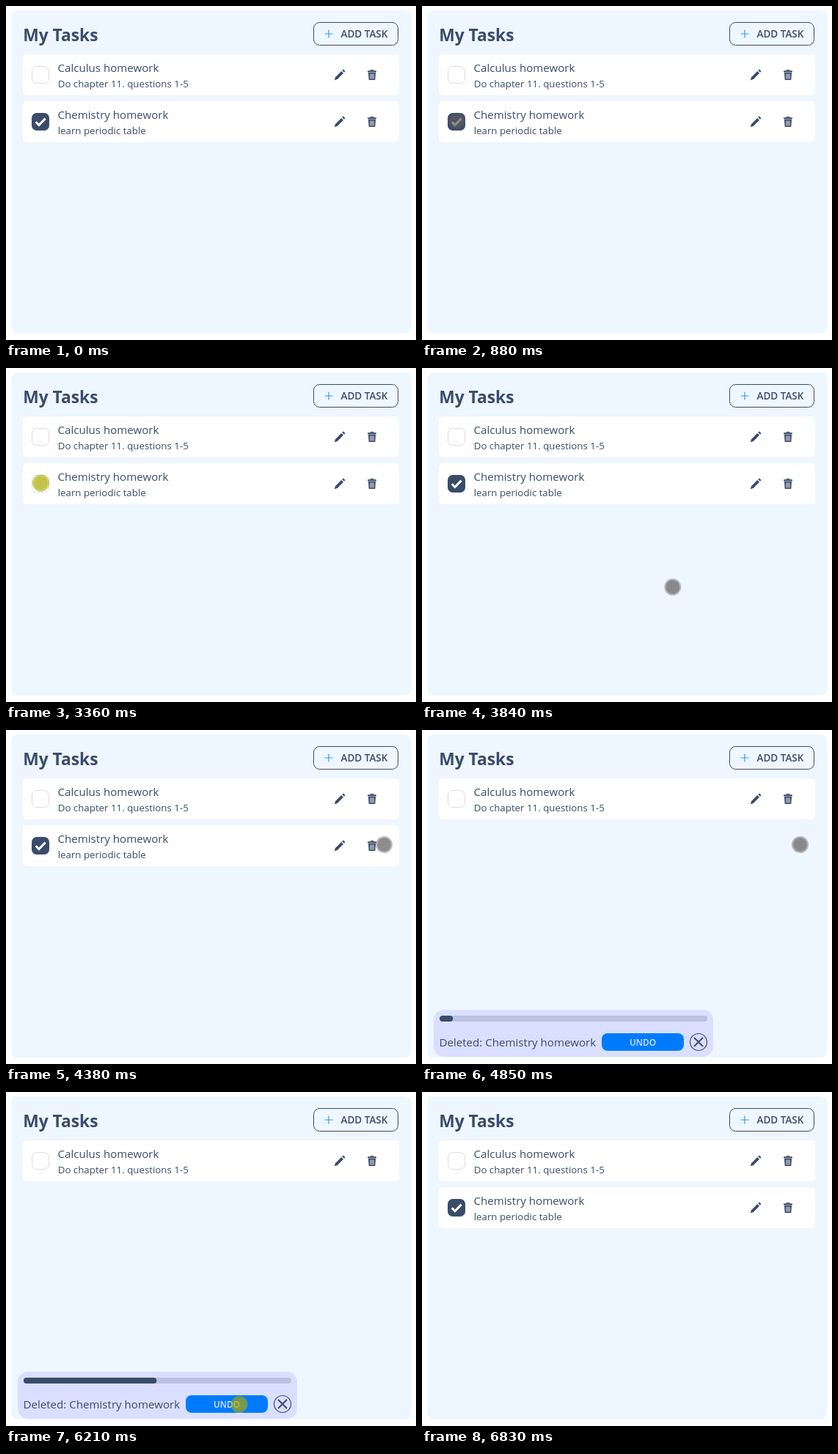
An HTML page for the animation above (7620 ms loop, 559 by 456 pixels).

```html
<!DOCTYPE html>
<html lang="en">
<head>
<meta charset="utf-8">
<title>My Tasks</title>
<style>
  html, body { margin: 0; width: 100%; height: 100%; overflow: hidden; background: #fff; }
  svg { display: block; width: 559px; height: 456px; font-family: "Open Sans", "Noto Sans", sans-serif; }
  .ink { fill: #3a4c6a; }
  .line { fill: none; stroke: #3a4c6a; }
  .name { font-size: 15.1px; }
  .note { font-size: 13.3px; }
  .title { font-size: 22.8px; font-weight: 700; }
  .add { font-size: 13.5px; font-weight: 600; }
  .undo { font-size: 11.8px; font-weight: 600; fill: #dde3ff; }
</style>
</head>
<body>
<svg viewBox="0 0 559 456">
  <defs>
    <g id="card">
      <rect x="23" y="66" width="513" height="56" rx="6" fill="#fff"/>
      <rect x="35.5" y="82.5" width="23" height="23" rx="6.5" fill="#fff" stroke="#d9dce2"/>
      <g class="ink">
        <path d="M447.8 101.2L449 97.2L457.2 89L460 91.8L451.8 100z"/>
        <path d="M458.2 88L460 86.5L462.5 89L461 90.8z"/>
        <rect x="493" y="88.3" width="12" height="2.2" rx="1"/>
        <path d="M494 91H504L503.3 101H494.7z"/>
      </g>
      <path class="line" d="M497 88.500V87.500H501V88.500"/>
      <path d="M497 92.500V99.500M499 92.500V99.500M501 92.500V99.500" stroke="#fff" stroke-width=".9"/>
    </g>
  </defs>

  <rect x="7.500" y="6" width="544.500" height="441" rx="8" fill="#eef6ff"/>
  <text class="ink title" x="23.200" y="48">My Tasks</text>
  <rect class="line" x="419.500" y="22.500" width="115" height="31" rx="8"/>
  <path d="M434.500 38H445.500M440 32.500V43.500" stroke="#3a9bea" stroke-width="1.200"/>
  <text class="ink add" x="456.500" y="43">ADD TASK</text>

  <use href="#card"/>
  <text class="ink name" x="70.500" y="90">Calculus homework</text>
  <text class="ink note" x="70.700" y="111">Do chapter 11. questions 1-5</text>

  <g id="second">
    <use href="#card" y="64"/>
    <text class="ink name" x="70.500" y="154">Chemistry homework</text>
    <text class="ink note" x="70.700" y="175">learn periodic table</text>
    <g id="tick">
      <rect class="ink" x="35" y="146" width="24" height="24" rx="7"/>
      <path d="M40.700 158.300L44.900 162.500L53.600 153.600" fill="none" stroke="#fff" stroke-width="3"/>
    </g>
  </g>

  <g id="toast">
    <rect x="16" y="382" width="381" height="64" rx="14" fill="#dadfff"/>
    <rect x="24" y="390" width="365" height="8" rx="4" fill="#b9c2e0"/>
    <rect id="bar" class="ink" x="24" y="390" height="8" rx="4"/>
    <text class="ink name" x="23.500" y="432">Deleted: Chemistry homework</text>
    <rect x="245" y="414" width="112" height="24" rx="8" fill="#007bff"/>
    <text class="undo" x="301" y="430.500" text-anchor="middle">UNDO</text>
    <circle class="line" cx="377" cy="426" r="11.500" stroke-width="1.200"/>
    <path class="line" d="M371 420L383 432M383 420L371 432" stroke-width="2"/>
  </g>

  <g id="cursor">
    <circle r="9.500" fill="currentColor" fill-opacity=".7"/>
    <circle id="ring" r="10.500" fill="none" stroke="currentColor" stroke-width="2"/>
  </g>
</svg>
<script>
const LOOP = 7620, CLICK = 140;
const [second, tick, toast, bar, cursor, ring] =
  ["second", "tick", "toast", "bar", "cursor", "ring"].map(id => document.getElementById(id));

const smooth = k => k * k * (3 - 2 * k);
const easeOut = k => 1 - (1 - k) ** 2;

const entry = [199, 441], box = [47.5, 157], below = [66, 218], side = [530, 215],
  trash = [515.5, 156.5], undo = [318, 426.5], exit = [306, 470];

// Pointer moves; "via" bends the way
const moves = [
  { start: 400, end: 880, from: entry, to: box, via: [60, 230], ease: easeOut },
  { start: 2120, end: 2340, from: box, to: below, via: [47, 187] },
  { start: 2890, end: 3210, from: below, to: box, via: [56, 184] },
  { start: 3480, end: 4110, from: box, to: side, via: [290, 410] },
  { start: 4110, end: 4380, from: side, to: trash, via: [527, 180] },
  { start: 4850, end: 6010, from: trash, to: undo },
  { start: 6350, end: 6830, from: undo, to: exit }
];
const clicks = [1210, 3360, 4640, 6140];

const within = (t, a, b) => t >= a && t < b;
const show = (el, on) => { el.style.display = on ? "" : "none"; };

function place(t) {
  const { start, end, from, to, via, ease = smooth } = moves.filter(m => m.start <= t).pop() || moves[0];
  const k = ease(Math.min(1, Math.max(0, (t - start) / (end - start))));
  return from.map((a, i) => {
    const mid = via ? via[i] : (a + to[i]) / 2;
    return a * (1 - k) ** 2 + 2 * mid * k * (1 - k) + to[i] * k * k;
  });
}

function draw(t) {
  const deleted = within(t, 4700, 6280);
  const pressed = clicks.some(c => within(t, c, c + CLICK));
  show(second, !deleted);
  show(toast, deleted);
  show(tick, !within(t, 1280, 3420));
  show(cursor, within(t, 400, 6830));
  bar.setAttribute("width", Math.max(0, (t - 4700) * .12));
  cursor.setAttribute("transform", `translate(${place(t)})`);
  cursor.style.color = pressed ? "#ada800" : "#5b5b5b";
  ring.style.strokeOpacity = pressed ? .6 : .42;
}

const begin = performance.now();
function loop() {
  draw((performance.now() - begin) % LOOP);
  requestAnimationFrame(loop);
}
loop();
</script>
</body>
</html>
```
